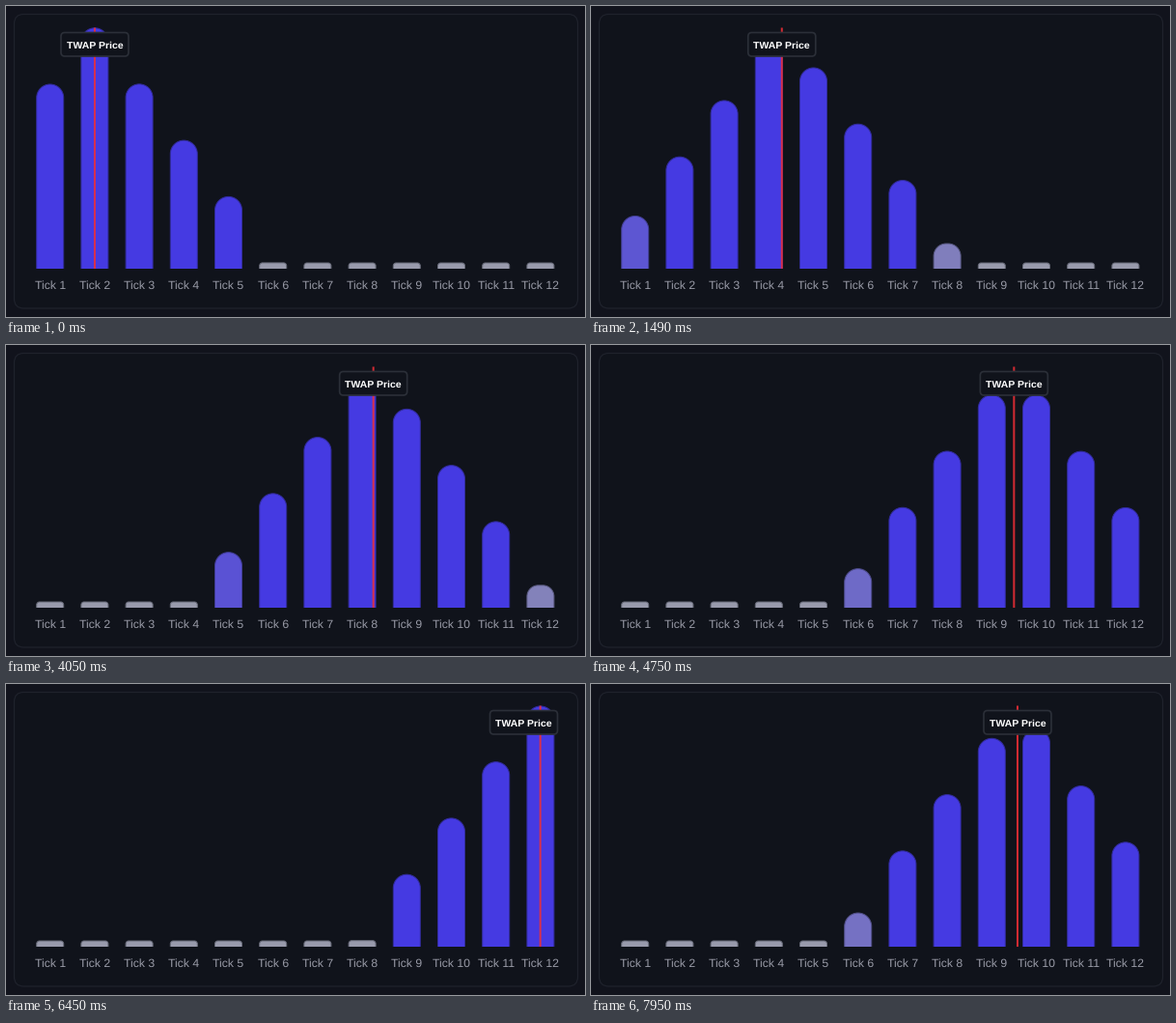
A matplotlib script that plays this animation: 600x322 px, repeating every 8 s.

```python
import matplotlib.pyplot as plt
from matplotlib.animation import FuncAnimation
from matplotlib.patches import FancyBboxPatch, PathPatch
from matplotlib.path import Path
import numpy as np

W, H, DPI = 600, 322, 100
LOOP, INTERVAL = 8000, 20
POSES = 150            # distinct poses per loop
STEP = 642.6           # ms from one tick to the next
TICKS, START = 12, 2.113
X0, DX, BAR_W, BASE = 45.7, 46.2, 28, 272
TOP = 22.5
MAX_LABEL_X = 536.5


def rgb(*c):
    return np.array(c) / 255


PAGE, PANEL, FRAME = rgb(17, 19, 28), rgb(16, 19, 27), rgb(31, 34, 44)
ACTIVE, IDLE = rgb(69, 58, 226), rgb(152, 154, 172)
RED, TAG_EDGE, TICK_TEXT = rgb(238, 46, 54), rgb(43, 47, 56), rgb(152, 154, 166)

plt.rcParams.update({"font.family": "Liberation Sans", "text.hinting": "none"})


def pt(px):
    return px * 72 / DPI


def tick_x(k):
    return X0 + DX * (k - 1)


def ease(f):
    return 8 * f**4 if f < 0.5 else 1 - 8 * (1 - f) ** 4


def peak_at(t):
    """Position of the price in ticks, bouncing back at the last tick."""
    u = START + t / STEP
    p = np.floor(u) + ease(u % 1)
    return p if p <= TICKS else 2 * TICKS - p


def bar_height(d):
    return np.interp(d, [0, 3, 4], [249.3, 74.5, 6])


def bar_path(x, h):
    l, r = x - BAR_W / 2, x + BAR_W / 2
    top = BASE - h
    rad = min(BAR_W / 2, h / 2)
    c = rad * 0.4477
    verts = [(l, BASE), (l, top + rad),
             (l, top + c), (l + c, top), (l + rad, top),
             (r - rad, top),
             (r - c, top), (r, top + c), (r, top + rad),
             (r, BASE)]
    codes = ([Path.MOVETO, Path.LINETO] + [Path.CURVE4] * 3
             + [Path.LINETO] + [Path.CURVE4] * 3 + [Path.LINETO])
    return Path(verts, codes)


def round_box(x, y, w, h, rad, fill, edge, lw, z):
    box = FancyBboxPatch((x, y), w, h, boxstyle=f"round,pad=0,rounding_size={rad}",
                         facecolor=fill, edgecolor=edge, linewidth=pt(lw), zorder=z)
    return ax.add_patch(box)


fig = plt.figure(figsize=(W / DPI, H / DPI), dpi=DPI, facecolor=PAGE)
ax = fig.add_axes([0, 0, 1, 1])
ax.set_xlim(0, W)
ax.set_ylim(H, 0)
ax.axis("off")

round_box(8.5, 8.5, 584, 304.5, 10, PANEL, FRAME, 1.2, 0)

bars = []
for k in range(1, TICKS + 1):
    bar = PathPatch(bar_path(tick_x(k), 6), linewidth=pt(1), capstyle="butt",
                    snap=False, zorder=2)
    bars.append(ax.add_patch(bar))
    ax.text(tick_x(k), 293, f"Tick {k}", size=pt(12.3), color=TICK_TEXT,
            ha="center", va="baseline")

line, = ax.plot([0, 0], [TOP, BASE], color=RED, alpha=0.88, lw=pt(2),
                solid_capstyle="butt", snap=False, zorder=3)
TAG_W = 70
tag = round_box(0, 27.5, TAG_W, 24.5, 4, PANEL, TAG_EDGE, 1.7, 4)
tag_text = ax.text(0, 43.6, "TWAP Price", size=pt(10.5), weight="bold",
                   color="white", ha="center", va="baseline", zorder=5)


def update(n):
    pose = int((n * INTERVAL + 15) * POSES / LOOP) % POSES
    p = peak_at(pose * LOOP / POSES)
    for k, bar in enumerate(bars, 1):
        d = abs(k - p)
        mix = np.clip(d - 3, 0, 1)
        fill = ACTIVE + (IDLE - ACTIVE) * mix
        bar.set_path(bar_path(tick_x(k), bar_height(d)))
        bar.set_facecolor(fill)
        bar.set_edgecolor(0.65 * fill + 0.35 * PANEL)
    x = tick_x(p)
    line.set_xdata([x, x])
    label_x = min(x, MAX_LABEL_X)
    tag.set_x(label_x - TAG_W / 2)
    tag_text.set_x(label_x)
    return [*bars, line, tag, tag_text]


anim = FuncAnimation(fig, update, frames=LOOP // INTERVAL, interval=INTERVAL,
                     repeat=True, repeat_delay=0, blit=False)
plt.show()
```
